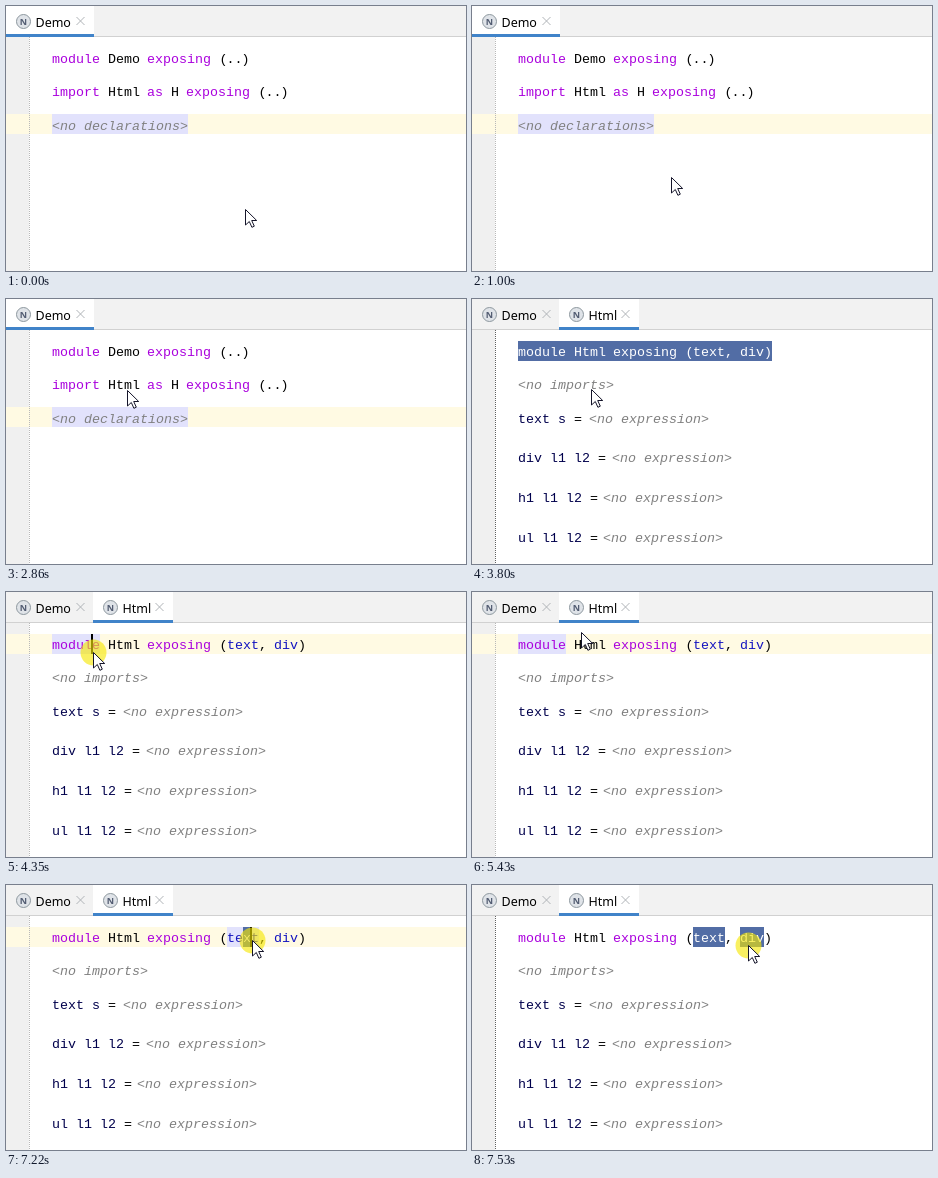
Animation, 460 px wide and 265 px high, one loop 7990 ms. Source, as an HTML page with a canvas:

```html
<!DOCTYPE html>
<html>
<head>
<meta charset="utf-8">
<style>
  html, body { margin: 0; width: 100%; height: 100%; overflow: hidden; background: #fff; }
  canvas { display: block; }
</style>
</head>
<body>
<canvas id="stage" width="460" height="265"></canvas>
<script>
const ctx = document.getElementById('stage').getContext('2d');
const LOOP = 7990;
const CODE = '13.333px "Liberation Mono", monospace';
const UI = '12.5px "Noto Sans", sans-serif';
const KEYWORD = '#aa00dd', NAME = '#00004c', LINK = '#1414c0', PLAIN = '#000', HINT = '#808080';
const SELECTION = '#526da5', CELL = '#e2e2fc', CARET_ROW = '#fffae3';

// Pointer moves: start, end, number of steps, x, y
const moves = [
  [780, 1310, 8, 112, 101],
  [1540, 1540, 1, 116, 98],
  [1770, 1770, 1, 117, 97],
  [1850, 1850, 1, 122, 81],
  [1930, 1930, 1, 114, 99],
  [2080, 2080, 1, 121, 91],
  [3800, 3800, 1, 119, 90],
  [3880, 4270, 6, 87, 60],
  [4670, 4970, 5, 142, 78],
  [5050, 5430, 6, 109, 40],
  [5510, 5590, 2, 108, 55],
  [5820, 6120, 5, 155, 64],
  [6520, 6670, 3, 256, 61],
  [6920, 7000, 2, 238, 54],
  [7080, 7220, 3, 246, 55],
  [7300, 7530, 4, 276, 60]
];

const within = (t, ...spans) => spans.some(([a, b]) => t >= a && t < b);

function pointerAt(t) {
  let x = 239, y = 203;
  for (const [start, end, n, toX, toY] of moves) {
    if (t < start) break;
    const step = n === 1 || t >= end ? n : 1 + Math.floor((t - start) / (end - start) * (n - 1) + 0.01);
    const p = step / n, eased = p * p * (3 - 2 * p);
    x += (toX - x) * eased;
    y += (toY - y) * eased;
  }
  return [Math.round(x), Math.round(y)];
}

function rect(x, y, w, h, color) {
  ctx.fillStyle = color;
  ctx.fillRect(x, y, w, h);
}

function text(str, x, y, color, font = CODE) {
  ctx.font = font;
  ctx.fillStyle = color;
  ctx.fillText(str, x, y);
}

const hint = (str, x, y) => text(str, x, y, HINT, 'italic ' + CODE);
const caret = (x, y) => rect(x, y, 2, 20, '#000');

function tab(label, x, width, active, icon = true) {
  if (active) {
    rect(x, 0, width, 28, '#fff');
    rect(x, 28, width, 3, '#4083c9');
  }
  if (icon) {
    ctx.beginPath();
    ctx.arc(x + 17.5, 15.5, 7, 0, 7);
    ctx.fillStyle = '#dfe3e8';
    ctx.fill();
    ctx.lineWidth = 1;
    ctx.strokeStyle = '#8e989f';
    ctx.stroke();
    ctx.textAlign = 'center';
    text('N', x + 17.5, 18.8, '#505a70', 'bold 9px "Noto Sans", sans-serif');
    ctx.textAlign = 'left';
  }
  text(label, x + 29.5, 21, '#000', UI);
  const cx = x + width - 13.5;
  ctx.beginPath();
  ctx.moveTo(cx - 4, 11); ctx.lineTo(cx + 4, 19);
  ctx.moveTo(cx + 4, 11); ctx.lineTo(cx - 4, 19);
  ctx.lineWidth = 1;
  ctx.strokeStyle = '#b0b4b8';
  ctx.stroke();
}

function guide(dark) {
  ctx.beginPath();
  ctx.setLineDash([1, 1]);
  ctx.moveTo(23.5, 31);
  ctx.lineTo(23.5, 265);
  ctx.lineWidth = 1;
  ctx.strokeStyle = dark ? '#606060' : '#b8b8b8';
  ctx.stroke();
  ctx.setLineDash([]);
}

function dots(x, y) {
  text('(', x, y, PLAIN);
  text('..', x + 7, y, PLAIN);
  text(')', x + 22, y, PLAIN);
}

function demoPage(t) {
  rect(0, 108, 460, 20, CARET_ROW);
  rect(46, 108, 136, 20, CELL);
  guide(false);
  text('module', 46, 57, KEYWORD);
  text('Demo', 102, 57, PLAIN);
  text('exposing', 141, 57, KEYWORD);
  dots(213.5, 57);
  text('import', 46, 90, KEYWORD);
  text('Html', 102, 90, PLAIN);
  text('as', 141, 90, KEYWORD);
  text('H', 165, 90, PLAIN);
  text('exposing', 180, 90, KEYWORD);
  dots(252.5, 90);
  hint('<no declarations>', 46, 124);
  if (within(t, [300, 800], [1310, 1850], [2310, 2860])) caret(46, 108);
}

function htmlPage(t, pointerX) {
  const lineSelected = t < 4350;
  const nodesSelected = t >= 7300;
  const divSelected = t >= 7450;
  const inText = within(t, [7000, 7300]);

  if (lineSelected) rect(46, 42, 254, 20, SELECTION);
  else if (!nodesSelected) rect(0, 42, 460, 20, CARET_ROW);
  if (within(t, [4350, 7000])) rect(46, 42, 48, 20, CELL);
  if (inText) rect(221, 42, 32, 20, CELL);
  if (nodesSelected) rect(221, 42, 32, 20, SELECTION);
  if (divSelected) rect(268, 42, 24, 20, SELECTION);

  const caretX = pointerX >= 244 ? 245 : 237;
  if (inText) rect(237, 42, caretX - 237, 20, SELECTION);
  guide(lineSelected || nodesSelected);

  const ink = (color, selected) => lineSelected || selected ? '#fff' : color;
  text('module', 46, 57, ink(KEYWORD));
  text('Html', 102, 57, ink(PLAIN));
  text('exposing', 141, 57, ink(KEYWORD));
  text('(', 213.5, 57, ink(PLAIN));
  text('text', 221, 57, ink(LINK, nodesSelected));
  if (inText && caretX > 237) text('x', 237, 57, '#fff');
  text(',', 253, 57, ink(PLAIN));
  text('div', 268, 57, ink(LINK, divSelected));
  text(')', 292, 57, ink(PLAIN));

  hint('<no imports>', 46, 90);
  const declarations = [
    ['text s', 124, 117], ['div l1 l2', 163, 140],
    ['h1 l1 l2', 203, 131], ['ul l1 l2', 243, 131]
  ];
  for (const [head, y, bodyX] of declarations) {
    text(head, 46, y, NAME);
    text('=', 46 + (head.length + 1) * 8, y, PLAIN);
    hint('<no expression>', bodyX, y);
  }

  if (within(t, [4350, 4880], [5510, 6040], [6520, 7000])) caret(85, 42);
  if (inText) caret(caretX - 1, 42);
}

function pointer(x, y, pressed) {
  if (pressed) {
    ctx.beginPath();
    ctx.arc(x + 0.5, y + 0.5, 13, 0, 7);
    ctx.fillStyle = 'rgba(245, 230, 0, 0.62)';
    ctx.fill();
  }
  ctx.save();
  ctx.translate(x + 0.5, y);
  ctx.fillStyle = '#fff';
  ctx.strokeStyle = '#15152a';
  ctx.lineWidth = 1;
  const arrow = new Path2D('M0 .5V16L3.8 12.5L6.4 18.3L8.8 17.2L6.2 11.5H11.2Z');
  ctx.fill(arrow);
  ctx.stroke(arrow);
  ctx.restore();
}

function draw(t) {
  const opened = t >= 3010;
  const [x, y] = pointerAt(t);
  rect(0, 0, 460, 265, '#fff');
  rect(0, 31, 23, 234, '#f0f0f0');
  rect(0, 0, 460, 30, '#f2f2f2');
  rect(0, 30, 460, 1, '#d1d1d1');
  tab('Demo', 0, 88, !opened);
  if (opened) {
    tab('Html', 87, 80, true, t >= 3250);
    htmlPage(t, x);
  } else {
    demoPage(t);
  }
  pointer(x, y, within(t, [4270, 4500], [7000, LOOP]));
}

const began = performance.now();
function tick() {
  draw((performance.now() - began) % LOOP);
  requestAnimationFrame(tick);
}
tick();
</script>
</body>
</html>
```
